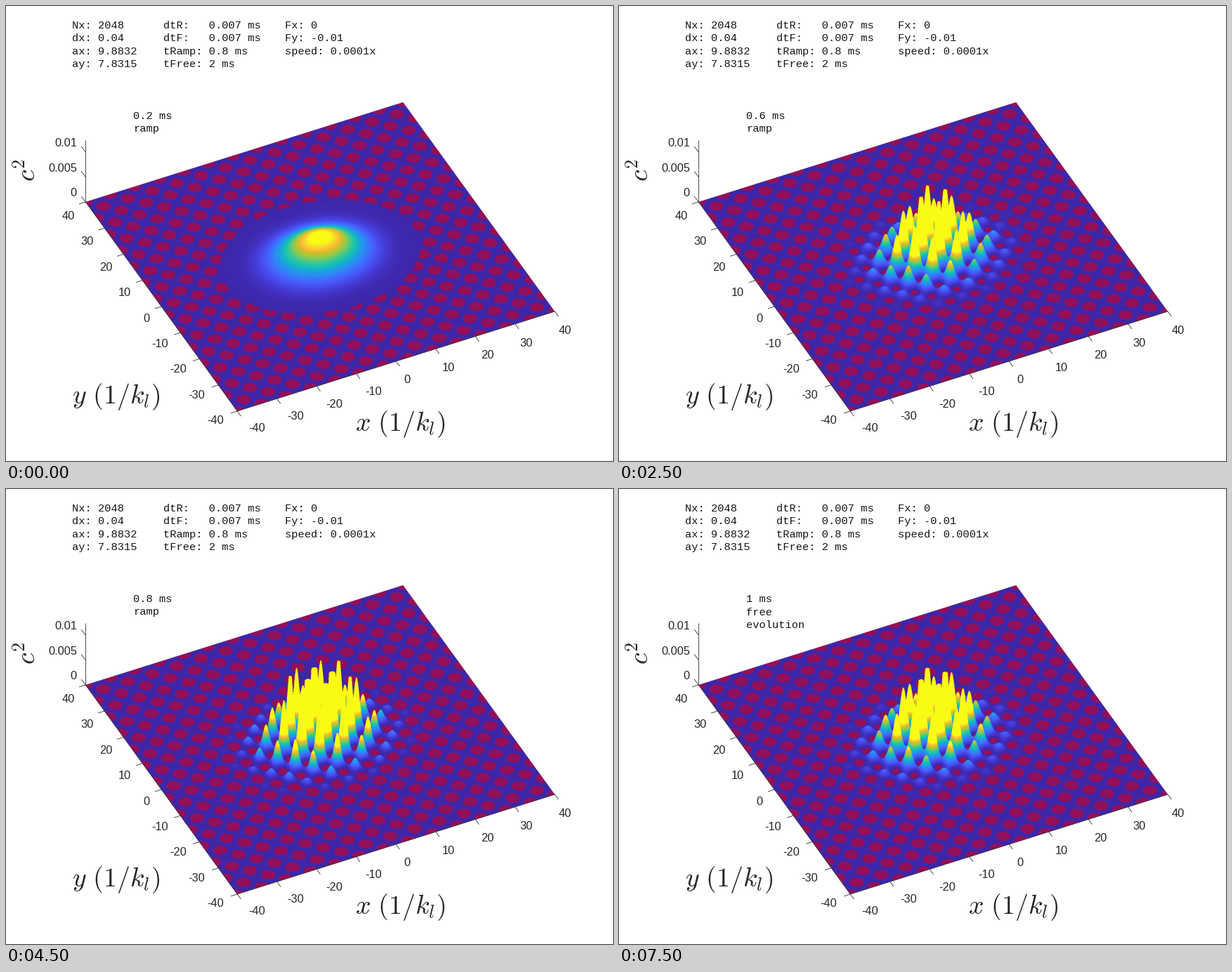
Write a matplotlib script that moves like this. It is 864 px wide and 648 px high and loops after 8000 ms.

```python
import numpy as np
import matplotlib.pyplot as plt
from matplotlib.animation import FuncAnimation

W, H = 864, 648
SS = 3                                  # supersampling
INTERVAL = 500
PI = np.pi
INK = "#262626"

# Affine view: stage position of (x, y) on the floor
CENTER = np.array([447.2, 357.0])
X_VEC = np.array([5.65, -1.775])
Y_VEC = np.array([-2.7, -3.725])
Z_PX = 7100                             # stage pixels per unit of c^2
Z_CLIP = 89
AX, AY = 9.8832, 7.8315
PEAK = Z_PX / (PI * AX * AY)
COLOR_MAX = 0.93 * PEAK
PITCH = 0.98 * PI
RED_LEVEL = 0.1
RED_RADIUS = 1.58

# Label, lattice contrast, ridge strength, sharpness, ticks on screen
STATES = [
    ("0.2 ms\nramp", 0.0, 0.0, 1.0, 1),
    ("0.4 ms\nramp", 0.82, 0.13, 2.0, 4),
    ("0.6 ms\nramp", 1.0, 0.0, 2.45, 4),
    ("0.8 ms\nramp", 1.0, 0.0, 3.9, 4),
    ("0.9 ms\nfree\nevolution", 1.0, 0.0, 3.9, 2),
    ("1 ms\nfree\nevolution", 0.95, 0.06, 3.2, 1),
]
TIMELINE = [i for i, s in enumerate(STATES) for _ in range(s[-1])]

STOPS = [0, .06, .125, .2, .25, .333, .4, .5, .6, .7, .8, .85, .9, .95, 1]
COLORS = np.array([
    (62, 38, 168), (67, 52, 200), (71, 70, 231), (71, 94, 251), (62, 109, 254),
    (45, 140, 243), (30, 156, 231), (18, 190, 185), (55, 200, 151),
    (129, 204, 89), (200, 193, 41), (234, 186, 48), (254, 195, 56),
    (245, 224, 40), (249, 251, 21)], float)
LUT = np.stack([np.interp(np.linspace(0, 1, 512), STOPS, c)
                for c in COLORS.T], axis=1).astype(np.float32)


def project(x, y):
    return CENTER + x * X_VEC + y * Y_VEC


def floor_coords(x0, x1, y0, y1):
    sx = (np.arange(x0 * SS, x1 * SS) + 0.5) / SS - CENTER[0]
    sy = (np.arange(y0 * SS, y1 * SS) + 0.5) / SS - CENTER[1]
    sx, sy = np.meshgrid(sx.astype(np.float32), sy.astype(np.float32))
    det = X_VEC[0] * Y_VEC[1] - X_VEC[1] * Y_VEC[0]
    return ((sx * Y_VEC[1] - sy * Y_VEC[0]) / det,
            (sy * X_VEC[0] - sx * X_VEC[1]) / det)


def downsample(img):
    h, w = img.shape[:2]
    return img.reshape(h // SS, SS, w // SS, SS, 3).mean(axis=(1, 3))


def paint_floor(x, y):
    """Blue floor with ringed red discs on a diagonal lattice."""
    img = np.full(x.shape + (3,), 255, np.float32)
    inside = (abs(x) <= 40) & (abs(y) <= 40)
    img[inside] = LUT[0]
    u, v = (x + y) / (2 * PITCH), (x - y) / (2 * PITCH)
    r = np.sqrt(2) * PITCH * np.hypot(u - np.round(u), v - np.round(v))
    rings = 0.56 + 0.34 * np.cos(2 * PI * (r - RED_RADIUS + 0.1) / 0.42)
    mix = (rings * (r < RED_RADIUS) * inside)[..., None]
    img += mix * (np.array([212, 0, 32], np.float32) - img)
    return img


def lattice(x, y, contrast, ridge, power):
    cu, cv = np.cos((x + y) * PI / PITCH), np.cos((x - y) * PI / PITCH)
    wave = 1 - contrast * (cu + cv) / 2 - ridge * cu * cv
    return np.maximum(wave, 0) ** power


BOX = (260, 640, 150, 486)
BOX_X, BOX_Y = floor_coords(*BOX)
BOX_FLOOR = paint_floor(BOX_X, BOX_Y)
STAGE = downsample(paint_floor(*floor_coords(0, W, 0, H)))
CELL = np.meshgrid(np.arange(64) * PITCH / 32, np.arange(64) * PITCH / 32)


def render(*shape):
    """Draw the density surface, nearer heights covering farther ones."""
    height = PEAK * np.exp(-(BOX_X / AX) ** 2 - (BOX_Y / AY) ** 2)
    height *= lattice(BOX_X, BOX_Y, *shape) / lattice(*CELL, *shape).mean()
    height = np.minimum(height, Z_CLIP).astype(np.float32) * SS
    seen = height.copy()
    for k in range(1, int(height.max()) + 1):
        np.copyto(seen[:-k], k, where=height[k:] >= k)
    seen /= SS
    index = np.clip(seen / COLOR_MAX * 511, 0, 511).astype(int)
    patch = np.where((seen < RED_LEVEL)[..., None], BOX_FLOOR, LUT[index])
    img = STAGE.copy()
    x0, x1, y0, y1 = BOX
    img[y0:y1, x0:x1] = downsample(patch)
    return np.clip(img, 0, 255).astype(np.uint8)


cache = {}


def picture(shape):
    if shape not in cache:
        cache[shape] = render(*shape)
    return cache[shape]


plt.rcParams["mathtext.fontset"] = "cm"
fig = plt.figure(figsize=(W / 72, H / 72), dpi=72, facecolor="white")
ax = fig.add_axes([0, 0, 1, 1])
ax.set_xlim(0, W)
ax.set_ylim(H, 0)
ax.axis("off")
surface = ax.imshow(picture(STATES[0][1:4]), extent=(0, W, H, 0),
                    interpolation="nearest", aspect="auto")


def line(p, q):
    ax.plot([p[0], q[0]], [p[1], q[1]], color=INK, lw=0.8, solid_capstyle="butt")


def mono(x, y, text=""):
    return ax.text(x, y, text, family="Liberation Mono", size=15.35,
                   color="#141414", va="baseline")


def tick_label(x, y, text, ha):
    ax.text(x, y, text, family="Liberation Sans", size=16.4, color=INK,
            ha=ha, va="center_baseline")


def axis_label(x, y, text, **kw):
    ax.text(x, y, text, size=37.8, color=INK, **kw)


# Axes and ticks
left, front, right = project(-40, 40), project(-40, -40), project(40, -40)
line(left, front)
line(front, right)
line(left, (left[0], 191))
for i in range(9):
    value = 10 * i - 40
    p = project(value, -40)
    line(p, p + (5.2, 7.2))
    tick_label(345 + 55.25 * i, 600.5 - 17.4 * i, str(value), "left")
    p = project(-40, -value)
    line(p, p + (-9.2, 2.9))
    tick_label(98 + 26.5 * i, 298 + 36.4 * i, str(-value), "right")
for i, text in enumerate(["0", "0.005", "0.01"]):
    p = left - (0, 35.5 * i)
    line(p, p - (6, 8))
    tick_label(101, 265 - 35.5 * i, text, "right")

axis_label(497, 605, r"$x\ (1/k_l)$", va="baseline")
axis_label(93.5, 566, r"$y\ (1/k_l)$", va="baseline")
axis_label(49, 250, r"$c^2$", rotation=90, ha="right", va="bottom")

# Parameter header
HEADER = [
    (94, ["Nx: 2048", "dx: 0.04", "ax: 9.8832", "ay: 7.8315"]),
    (224, ["dtR:   0.007 ms", "dtF:   0.007 ms", "tRamp: 0.8 ms", "tFree: 2 ms"]),
    (397, ["Fx: 0", "Fy: -0.01", "speed: 0.0001x"]),
]
for x, rows in HEADER:
    for i, row in enumerate(rows):
        mono(x, 31.8 + 18.4 * i, row)
status = [mono(181, 161 + 18.5 * i) for i in range(3)]


def update(frame):
    label, *shape, _ = STATES[TIMELINE[frame]]
    surface.set_data(picture(tuple(shape)))
    rows = label.split("\n")
    for i, item in enumerate(status):
        item.set_text(rows[i] if i < len(rows) else "")
    return [surface, *status]


anim = FuncAnimation(fig, update, frames=len(TIMELINE), interval=INTERVAL,
                     repeat=True, repeat_delay=0, blit=False)
plt.show()
```
